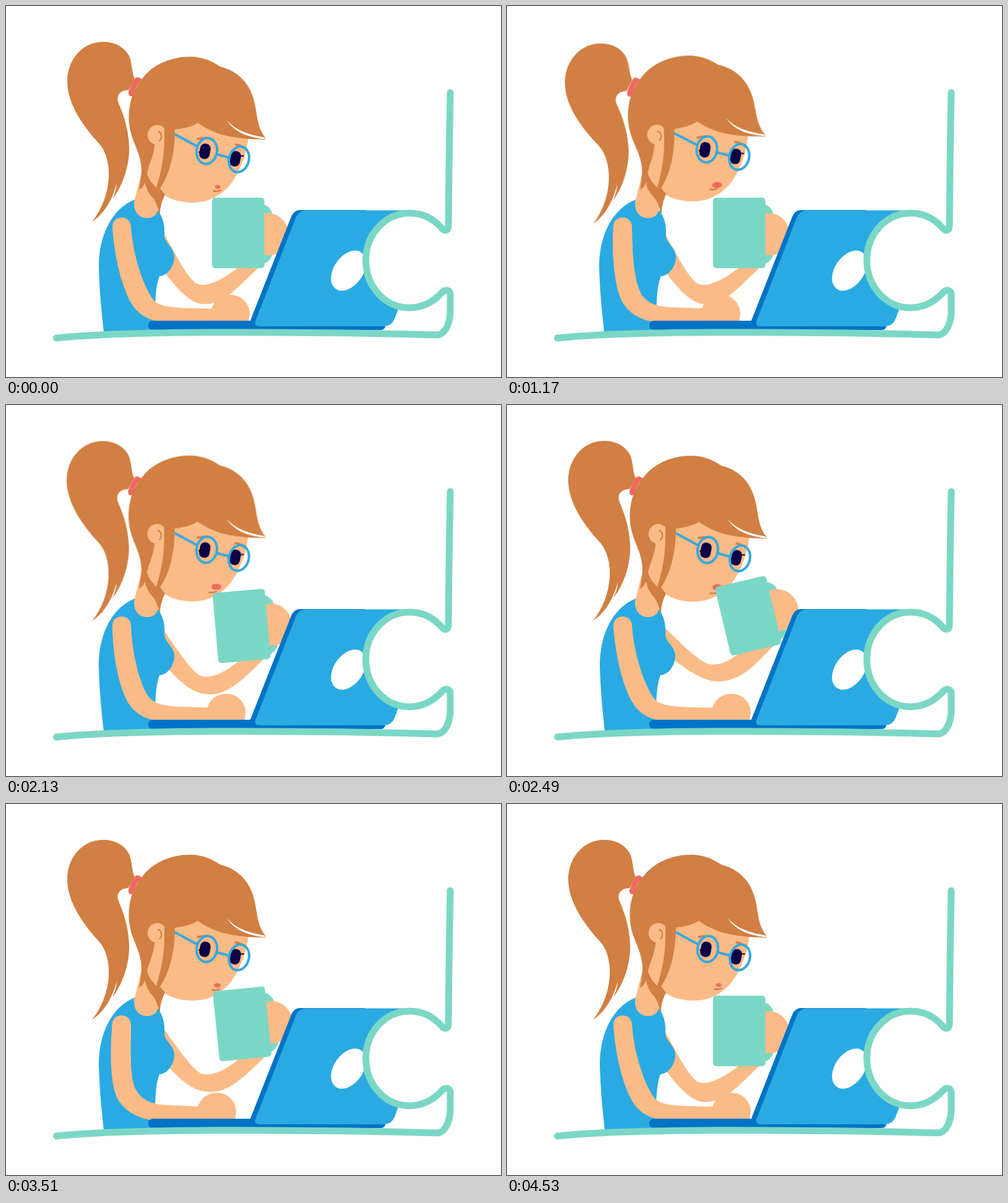
Recreate the animation shown at these times as an HTML page without scripts. Size 800 by 600 pixels, loop 4560 ms.

```html
<!DOCTYPE html>
<html lang="en">
<head>
<meta charset="utf-8">
<title>Coffee at the laptop</title>
<style>
  html, body { margin: 0; width: 100%; height: 100%; overflow: hidden; background: #fff; }
  svg { display: block; width: 100vw; height: 100vh; }

  .skin { fill: #fbbb87; }
  .hair { fill: #d17f42; }
  .blue { fill: #2aaae2; }
  .navy { fill: #0073c6; }
  .mint { fill: #7bd7c5; }
  .red { fill: #ee6a60; }
  .white { fill: #fff; }
  .line { fill: none; stroke-linecap: round; stroke-linejoin: round; }
  .brow { stroke: #d17f42; stroke-width: 3.5; }
  .frame { stroke: #35a9dc; stroke-width: 4; }
  .lash { stroke: #0d0045; stroke-width: 2; }
  .edge { stroke: #7bd7c5; stroke-width: 11; }

  .move { animation: 4560ms ease-in-out infinite; }
  .head { animation-name: tilt; transform-origin: 225px 292px; }
  .tail { animation-name: tilt; transform-origin: 255px 330px; }
  .body { animation-name: breathe; transform-origin: 210px 420px; }
  .cup { animation-name: sip; transform-origin: 375px 367px; }
  .far-arm { animation-name: bend; }
  .near-arm { animation-name: slide; }
  .lips { animation-name: lips; }
  .crease { animation-name: crease; }
  .pupil { animation-name: blink; transform-box: fill-box; transform-origin: 50% 55%; }

  @keyframes tilt {
    0%, 9% { transform: none; }
    25%, 33% { transform: rotate(-1.5deg); }
    39% { transform: rotate(-1.3deg); }
    50%, 100% { transform: none; }
  }
  @keyframes breathe {
    0%, 9% { transform: none; }
    25%, 39% { transform: scaleX(1.018); }
    50%, 100% { transform: none; }
  }
  @keyframes sip {
    0%, 39.2% { transform: none; }
    57.5%, 69% { transform: translate(15.5px, -27.5px) rotate(-14deg); }
    83.5%, 100% { transform: none; }
  }
  @keyframes bend {
    0%, 39.2%, 83.5%, 100% {
      d: path("M250 358C270 394 292 439 308 449C324 456 350 443 375 423L425 375L440 395C425 405 400 432 375 455C350 478 335 482 320 482C299 482 277 459 254 427Z");
    }
    57.5%, 69% {
      d: path("M250 355C280 384 310 412 325 417C340 421 356 415 372 403L425 365L440 382C425 391 405 420 380 435C355 448 335 448 315 439C295 430 270 410 255 400Z");
    }
  }
  @keyframes slide {
    0%, 9.9%, 54.8%, 99.3%, 100% {
      d: path("M172 357C172 337 202 337 202 357C205 400 220 450 238 475C246 485 262 487 290 488.500L332 489.500C337 475 349 467 363 467C381 467 394 482 394 497L392 512L260 512C235 510 221 503 209 490C188 465 174 400 172 357Z");
    }
    33.6%, 76.6% {
      d: path("M171.500 357C171.500 337 202 337 202 357C202 400 200 432 207 455C215 478 234 486 262 487L310 489C315 475 327 467 341 467C359 467 372 482 372 497L370 512L245 513C221 510 194 502 180 476C168 451 168 400 171.500 357Z");
    }
  }
  @keyframes lips {
    0%, 11% { transform: translate(342px, 292.5px) scale(.56, .58); }
    22%, 39% { transform: translate(339.5px, 292.5px) scale(1); }
    50%, 69% { transform: translate(340px, 295px) scale(1); }
    82%, 100% { transform: translate(342px, 292.5px) scale(.56, .58); }
  }
  @keyframes crease {
    0%, 11% { transform: none; }
    22%, 39% { transform: translate(-7.5px, 0); }
    50%, 69% { transform: translate(-7px, 5px); }
    82%, 100% { transform: none; }
  }
  @keyframes blink {
    0%, 81.6% { transform: none; }
    84.4%, 85.4% { transform: scale(.55, .45); }
    88.2%, 100% { transform: none; }
  }
</style>
</head>
<body>
<svg viewBox="0 0 800 600">
  <path class="skin move far-arm" d="M250 358C270 394 292 439 308 449C324 456 350 443 375 423L425 375L440 395C425 405 400 432 375 455C350 478 335 482 320 482C299 482 277 459 254 427Z"/>

  <!-- body and neck -->
  <path class="blue move body" d="M208 313C173 327 150 368 150 422C151 462 155 500 158 527H245L241 485C242 465 243 450 248 437C262 436 272 420 272 405C271 390 257 384 256 372C257 352 253 342 246 331Z"/>
  <path class="skin" d="M220 265L207 317C206 334 216 343 228 343C240 343 247 335 246 322L250 280Z"/>

  <path class="hair move tail" d="M208 118C203 108 204 92 199 81C190 63 170 57 155 58C122 59 99 88 99 122C99 158 125 195 150 222C174 248 172 308 139 349C160 335 172 312 179 287C179 295 175 305 172 312C190 290 200 255 199 228C198 195 188 172 181.500 156C178 145 184 136 198 136Z"/>

  <g class="move head">
    <path class="skin" d="M238 190L226 275L247 298C260 312 280 318 302 318C335 318 362 298 375 268C385 250 390 230 393 205L310 170Z"/>
    <path class="hair" d="M219 119C236 95 266 82 298 82C318 82 335 90 346 98C375 105 393 125 400 150C407 174 404 193 419 213L420 216C395 216 360 213 340 205C328 200 318 195 310 189C299 196 286 198 273 200C273 235 266 270 249 295L257 305C252 315 249 325 249 335H247C245 323 242 317 238 311C231 304 226 295 225 285C222 292 219 295 215 297C217 285 219 275 219 265C218 235 202 220 199 190C197 165 202 140 219 119Z"/>
    <path class="skin" d="M241 215H256C256 235 253 262 243 294C236 287 231 281 228 271C231 255 240 242 241 215Z"/>
    <path class="skin" d="M256 198V219A15.500 16 0 1 1 256 198Z"/>
    <path class="line brow" style="stroke-width:2" d="M246 203C252 205 253 214 248 218"/>
    <path class="white" d="M357 185C371 201 393 208.500 417 212.500L420 215.500C391 212.500 370 204.500 357 185Z"/>
    <path class="red" d="M208 118Q211 114 215 116L220 119C212 126 207 136 206 146L201 146Q197 144 198 139C201 130 204 124 208 118Z"/>

    <path class="line brow" d="M310 215Q318 213 326 213.500M371 224Q380 225 387 231"/>
    <g fill="#0d0045">
      <g transform="rotate(10 321.500 235)"><rect class="move pupil" x="313" y="222.500" width="17" height="25" rx="8"/></g>
      <g transform="rotate(12 370.500 247)"><rect class="move pupil" x="362" y="234.500" width="17" height="25" rx="8"/></g>
    </g>
    <path class="line lash" d="M312 236L320 236.500M372 246L378 242.500L384 242.500"/>
    <g class="line frame">
      <ellipse cx="324.500" cy="234.500" rx="16.500" ry="21" transform="rotate(9 324.500 234.500)"/>
      <ellipse cx="376.500" cy="248" rx="16" ry="21" transform="rotate(15 376.500 248)"/>
      <path d="M274 208L309 227M341 240L360 245"/>
    </g>

    <ellipse class="red move lips" rx="8" ry="5" transform="translate(342 292.500) scale(.56 .58)"/>
    <path class="line brow move crease" style="stroke-width:2.500" d="M335.500 299Q341 301 347 298"/>
  </g>

  <g class="move cup">
    <path class="mint" d="M412 320C424 321 431 331 431 342V396C431 408 424 416 412 418Z"/>
    <path class="skin" d="M415 335H425C443 336 457 352 457 371C457 390 443 403 425 403H415Z"/>
    <rect class="mint" x="333" y="310" width="84.500" height="114" rx="5"/>
  </g>

  <path class="skin move near-arm" d="M172 357C172 337 202 337 202 357C205 400 220 450 238 475C246 485 262 487 290 488.500L332 489.500C337 475 349 467 363 467C381 467 394 482 394 497L392 512L260 512C235 510 221 503 209 490C188 465 174 400 172 357Z"/>

  <!-- laptop -->
  <rect class="navy" x="230" y="509" width="383" height="15" rx="6.500"/>
  <path class="navy" d="M394 511L460.500 342Q465 330 475 330H580V345L430 519H396Z"/>
  <path class="blue" d="M403 510L468 343Q473 330.500 485 330.500H650L634 490L628 506Q623 518 611 518H410Q401 518 403 510Z"/>
  <ellipse class="white" cx="553.500" cy="428" rx="36" ry="23.500" transform="rotate(-55 553.500 428)"/>

  <!-- puzzle outline and table -->
  <ellipse class="white" cx="652" cy="411" rx="70" ry="76"/>
  <path class="line edge" d="M718 140Q716 240 715 355C715 364 709 365 704 359C690 343 672 335 652 335C613 335 581.500 369 581.500 411C581.500 454 613 488 652 488C672 488 690 479 704 464C710 457 718 459 718 467V496C717 515 709 532 696 532Q590 529 500 528.500Q200 525 81.500 537"/>
</svg>
</body>
</html>
```
